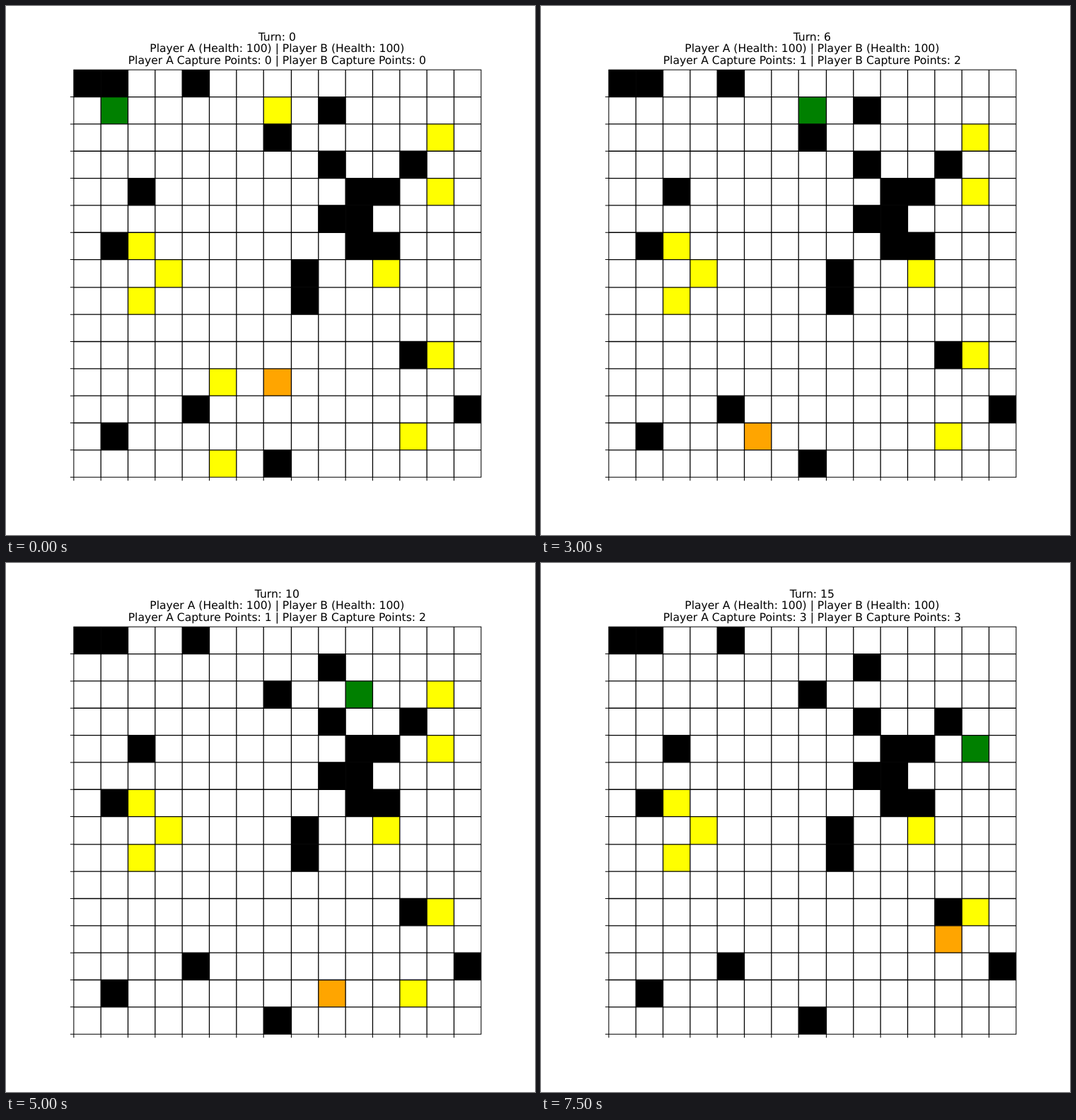
Animation, 748 px wide and 748 px high, one loop 8 s. Source, as an HTML page:

```html
<!DOCTYPE html>
<html lang="en">
<head>
<meta charset="utf-8">
<title>Grid capture</title>
<style>
  html, body { margin: 0; width: 100%; height: 100%; overflow: hidden; background: #fff; }
  svg { display: block; width: 748px; height: 748px; }
  text {
    font: 15.6px "DejaVu Sans", sans-serif;
    text-anchor: middle;
    text-rendering: geometricPrecision;
    white-space: pre;
  }
  path { stroke: #000; fill: none; }
  #grid { stroke-width: 1.3; }
  #frame { stroke-width: 1.04; stroke-linecap: square; }
</style>
</head>
<body>
<svg viewBox="0 0 748 748">
  <g id="cells"></g>
  <path id="grid"/>
  <path id="frame"/>
  <text id="turn" x="383.3" y="48.8"></text>
  <text x="383.3" y="65.2">Player A (Health: 100) | Player B (Health: 100)</text>
  <text id="score" x="383.3" y="82.2"></text>
</svg>
<script>
const SIZE = 15, TURN_MS = 500, TICK = 4.5;

// # wall, o capture point
const MAP = [
  '##..#..........',
  '.......o.#.....',
  '.......#.....o.',
  '.........#..#..',
  '..#.......##.o.',
  '.........##....',
  '.#o.......##...',
  '...o....#..o...',
  '..o.....#......',
  '...............',
  '............#o.',
  '.....o.........',
  '....#.........#',
  '.#..........o..',
  '.....o.#.......',
];
const STEP = { L: [-1, 0], R: [1, 0], U: [0, -1], D: [0, 1] };
const PLAYERS = [
  { start: [1, 1], moves: 'RRRRRRRDRRRRRDD', color: '#008000' },
  { start: [7, 11], moves: 'LLDDDURRRRRRRUU', color: '#ffa500' },
];
const TURNS = PLAYERS[0].moves.length + 1;

const $ = id => document.getElementById(id);

// Grid lines sit on whole pixels of an 800 px figure, scaled to the stage
const line = (origin, i) => (Math.round(origin + i * 616 / SIZE) + 0.5) * 0.935;
const X = i => line(102, i);
const Y = i => line(96, i);

function addCell(col, row, fill) {
  const rect = document.createElementNS('http://www.w3.org/2000/svg', 'rect');
  rect.setAttribute('fill', fill);
  $('cells').append(rect);
  place(rect, col, row);
  return rect;
}

function place(rect, col, row) {
  rect.setAttribute('x', X(col));
  rect.setAttribute('y', Y(row));
  rect.setAttribute('width', X(col + 1) - X(col));
  rect.setAttribute('height', Y(row + 1) - Y(row));
}

function drawLines() {
  const [left, right, top, bottom] = [X(0), X(SIZE), Y(0), Y(SIZE)];
  let grid = '', frame = `M${left} ${top}H${right}V${bottom}H${left}Z`;
  for (let i = 1; i < SIZE; i++) {
    grid += `M${X(i)} ${top}V${bottom}M${left} ${Y(i)}H${right}`;
  }
  for (let i = 0; i < SIZE; i++) {
    frame += `M${X(i)} ${bottom}v${TICK}M${left} ${Y(i + 1)}h${-TICK}`;
  }
  $('grid').setAttribute('d', grid);
  $('frame').setAttribute('d', frame);
}

// Replays the moves from the start up to the given turn
function stateAt(turn) {
  const pos = PLAYERS.map(p => [...p.start]);
  const scores = [0, 0], taken = new Set();
  for (let t = 0; t < turn; t++) {
    PLAYERS.forEach((p, i) => {
      const [dx, dy] = STEP[p.moves[t]];
      pos[i][0] += dx;
      pos[i][1] += dy;
      const key = String(pos[i]);
      if (MAP[pos[i][1]][pos[i][0]] === 'o' && !taken.has(key)) {
        taken.add(key);
        scores[i]++;
      }
    });
  }
  return { pos, scores, taken };
}

const points = new Map();
MAP.forEach((cells, row) => [...cells].forEach((c, col) => {
  if (c === '#') addCell(col, row, '#000');
  if (c === 'o') points.set(`${col},${row}`, addCell(col, row, '#ff0'));
}));
const pieces = PLAYERS.map(p => addCell(...p.start, p.color));
drawLines();

let shown = -1;
function show(turn) {
  if (turn === shown) return;
  shown = turn;
  const { pos, scores, taken } = stateAt(turn);
  pieces.forEach((rect, i) => place(rect, ...pos[i]));
  points.forEach((rect, key) => rect.setAttribute('visibility', taken.has(key) ? 'hidden' : 'visible'));
  $('turn').textContent = `Turn: ${turn}`;
  $('score').textContent =
    `Player A Capture Points: ${scores[0]} | Player B Capture Points: ${scores[1]}`;
}

function tick() {
  show(Math.floor(performance.now() / TURN_MS) % TURNS);
  requestAnimationFrame(tick);
}
tick();
</script>
</body>
</html>
```
